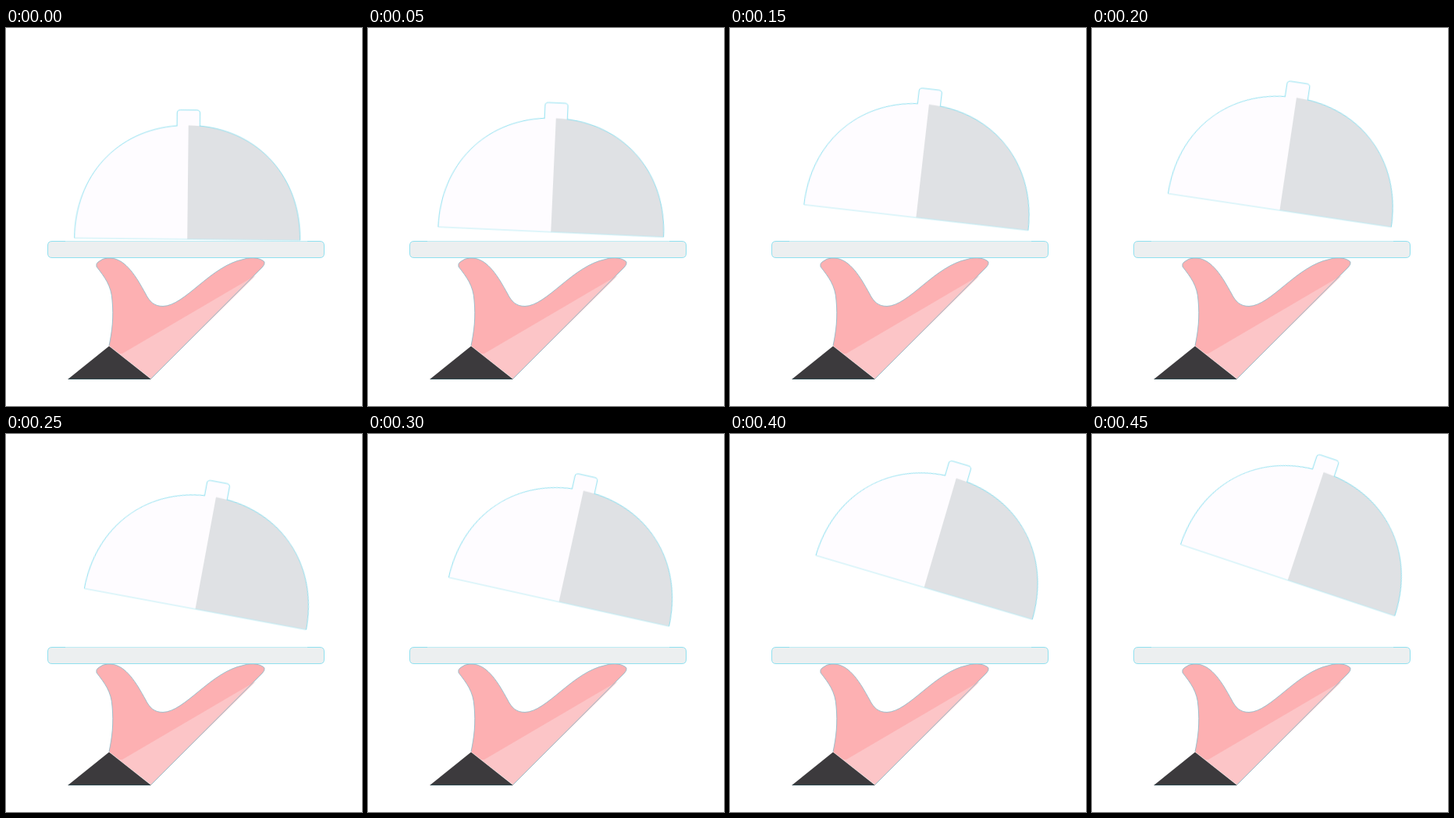
An HTML page without scripts that plays this animation: 456x483 px, repeating every 0.5 s.

```html
<!DOCTYPE html>
<html lang="en">
<head>
<meta charset="utf-8">
<title>Serving dome</title>
<style>
  html, body { margin: 0; width: 100%; height: 100%; overflow: hidden; background: #fff; }
  svg { display: block; width: 456px; height: 483px; }
  .line { fill: none; stroke: #7fdcee; stroke-width: .85; }
  .pale { stroke: #b4eaf4; }
  .skin-edge { stroke: #8dbac8; }
  .white { fill: #fefcff; }
  .shade { fill: #dfe1e4; }
  /* the rim line stops where the knob begins */
  .rim { stroke-dasharray: 216 400; }
  .lid { transform-origin: 0 0; animation: lift 500ms steps(10, end) infinite; }
  @keyframes lift {
    from { transform: translate(232.2px, 269.9px) rotate(0.6deg); }
    to   { transform: translate(252.7px, 177.6px) rotate(20.4deg); }
  }
</style>
</head>
<body>
<svg viewBox="0 0 456 483">
  <defs>
    <path id="hand" d="M132 406C136 387 138 370 136 348C135 329 126 318 116 305Q115 301 118 299Q124 294 130 294H134C154 295 168 320 178.500 339C184 350 190 355.500 201 355.500C229 355 262 304 304 295.500C315 292 327 294 331 299Q332 302 328 306L186 448"/>
    <path id="half" pathLength="376" d="M-144.500 0C-144.500 -85 -84.500 -145.500 0 -145.500V0"/>
  </defs>

  <!-- hand and cuff -->
  <use href="#hand" fill="#fdb0b2"/>
  <path d="M149 416L320 316L186 448L145 416Z" fill="#fcc5c7"/>
  <use href="#hand" class="line skin-edge"/>
  <path d="M79 449L132 406.500L186 449Z" fill="#3c3a3d"/>
  <path d="M80 448.500H185" class="line" style="stroke:#2f5058"/>

  <!-- tray -->
  <rect x="53.500" y="272.500" width="354" height="21" rx="5.500" fill="#eceff0"/>
  <path d="M76 272.500H386" class="line pale"/>
  <path d="M76 272.500H59Q53.500 272.500 53.500 278V288Q53.500 293.500 59 293.500H402Q407.500 293.500 407.500 288V278Q407.500 272.500 402 272.500H386" class="line"/>

  <!-- lid, with the middle of its base at 0,0 -->
  <g class="lid">
    <path d="M-14.700 -143V-161Q-14.700 -165.100 -10.500 -165.100H10.500Q14.700 -165.100 14.700 -161V-143" class="line" style="fill:#fefcff"/>
    <use href="#half" class="white"/>
    <use href="#half" class="shade" transform="scale(-1 1)"/>
    <use href="#half" class="line rim"/>
    <use href="#half" class="line rim" transform="scale(-1 1)"/>
    <path d="M-144.500 0H144.500" class="line pale"/>
  </g>
</svg>
</body>
</html>
```
